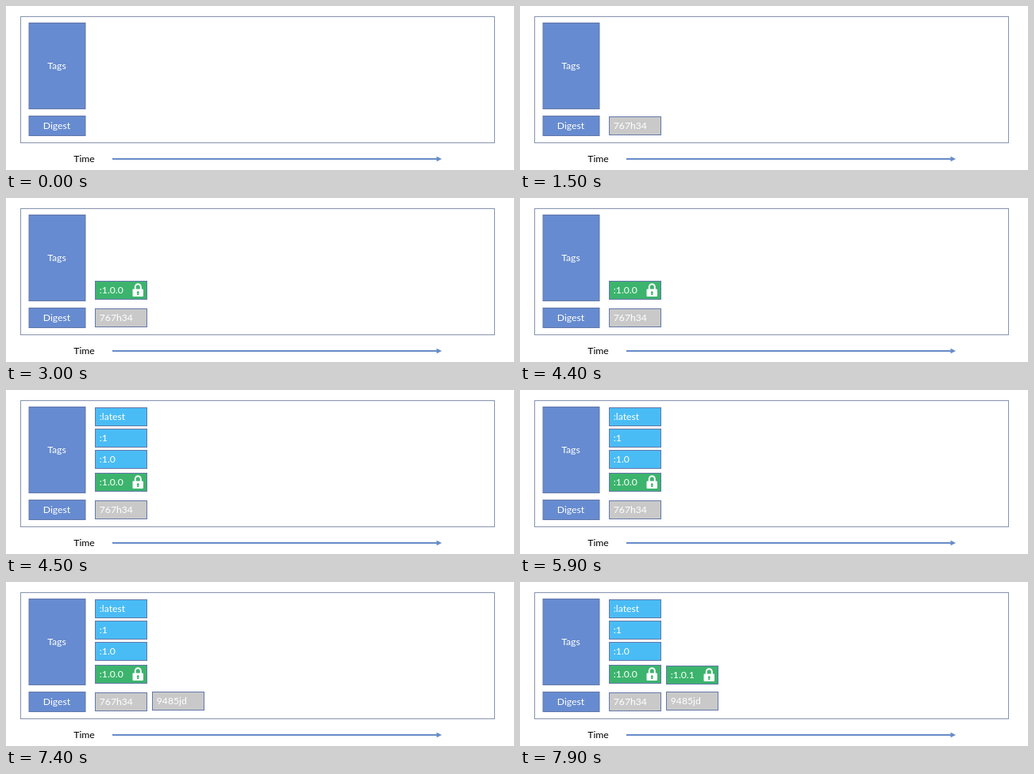
Write an HTML page that moves like this. It is 640x208 px and loops after 8 s.

```html
<!DOCTYPE html>
<html lang="en">
<head>
<meta charset="utf-8">
<title>Tags and digests over time</title>
<style>
  html, body { margin: 0; width: 100%; height: 100%; overflow: hidden; background: #fff; }
  svg { display: block; width: 640px; height: 208px; }
  text { font: 12.2px Lato, Carlito, sans-serif; fill: #fff; }
  .head { text-anchor: middle; }
  .box { stroke: #6478a8; }
</style>
</head>
<body>
<svg id="stage" viewBox="0 0 640 208">
  <defs>
    <g id="lock">
      <path d="M3.3 8V4.8a3.5 3.5 0 0 1 7 0V8" fill="none" stroke="#fff" stroke-width="2"/>
      <rect y="7.6" width="13.5" height="9.4" rx="1" fill="#fff"/>
      <path d="M6.8 10.3a1.5 1.5 0 0 1 .8 2.7l.4 2H5.6l.4-2a1.5 1.5 0 0 1 .8-2.7" fill="#3cb46d"/>
    </g>
  </defs>
  <rect x="18.5" y="13.5" width="597" height="160" fill="#fff" stroke="#8792ad"/>
  <g class="box" fill="#668bd0">
    <rect x="29" y="21.5" width="71" height="109"/>
    <rect x="29" y="139.5" width="71" height="25"/>
  </g>
  <g class="head">
    <text x="64" y="80.3">Tags</text>
    <text x="64" y="156.4">Digest</text>
    <text x="98.5" y="198.2" style="fill:#000">Time</text>
  </g>
  <path d="M134 194H544" stroke="#668bc8" stroke-width="2"/>
  <path d="M542.5 190.8L549 194L542.5 197.2Z" fill="#668bc8"/>
</svg>
<script>
const LOOP = 8000;
const GREY = '#c9c9c9', GREEN = '#3cb46d', SKY = '#4abcf5';
const stage = document.getElementById('stage');

// start time, x, y, fill, label
const items = [
  [1500, 112.5, 140.5, GREY, '767h34'],
  [3000, 112.5, 105.5, GREEN, ':1.0.0'],
  [4500, 112.5, 22.5, SKY, ':latest'],
  [4500, 112.5, 49.5, SKY, ':1'],
  [4500, 112.5, 76.5, SKY, ':1.0'],
  [6000, 184.5, 139.5, GREY, '9485jd'],
  [7500, 184.5, 106.5, GREEN, ':1.0.1']
].map(([start, x, y, fill, label]) => {
  const node = document.createElementNS('http://www.w3.org/2000/svg', 'g');
  node.setAttribute('transform', `translate(${x} ${y})`);
  node.innerHTML = `<rect class="box" width="65" height="23" fill="${fill}"/>
    <text x="5.3" y="15.8">${label}</text>` +
    (fill === GREEN ? '<use href="#lock" x="47" y="2.5"/>' : '');
  stage.append(node);
  return { start, node };
});

function draw(now) {
  const t = now % LOOP;
  for (const { start, node } of items)
    node.setAttribute('visibility', t >= start ? 'visible' : 'hidden');
  requestAnimationFrame(draw);
}
draw(performance.now());
</script>
</body>
</html>
```
